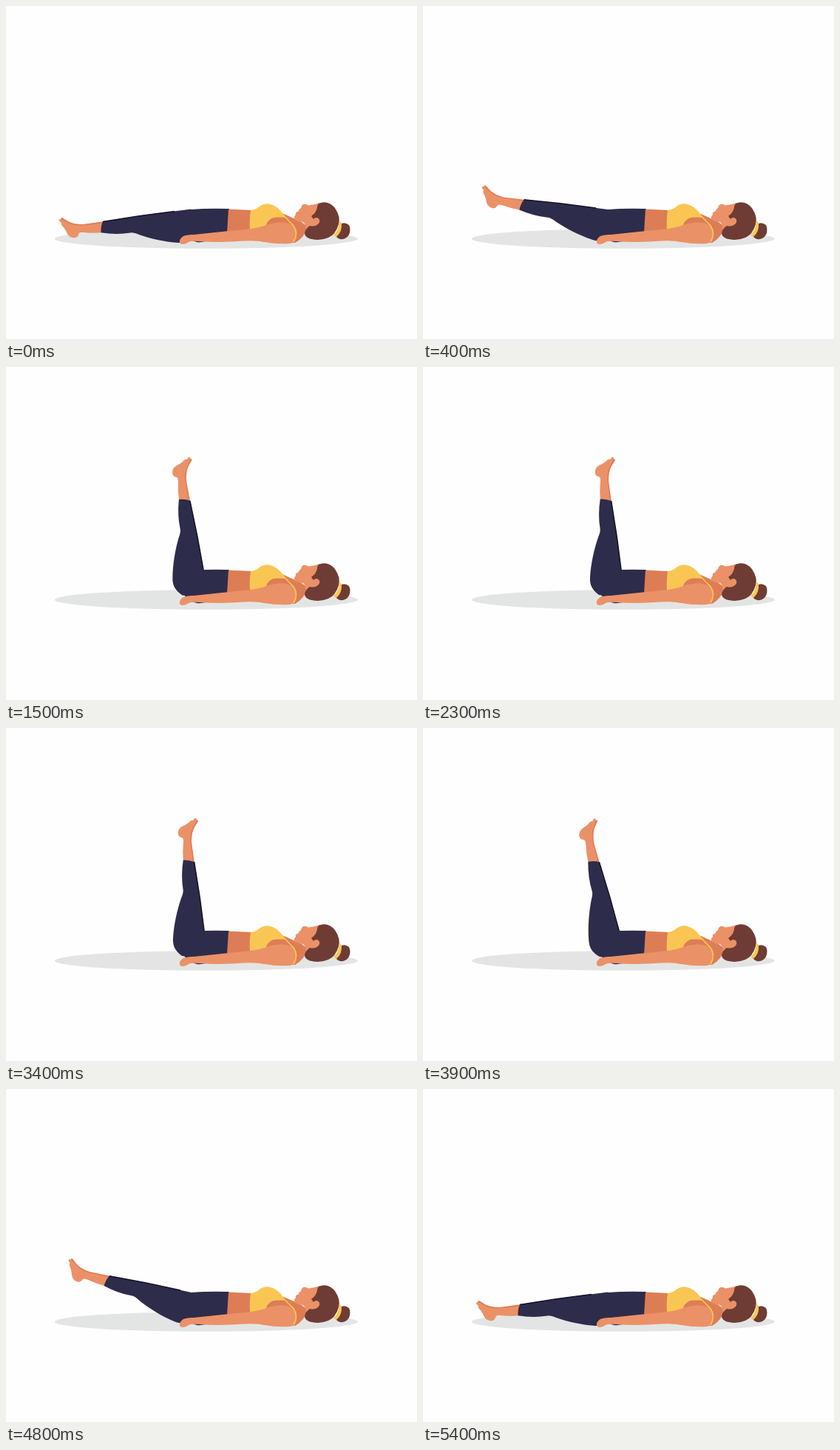
Write an HTML page with a canvas that moves like this. It is 556 px wide and 450 px high and loops after 6000 ms.

```html
<!DOCTYPE html>
<html lang="en">
<head>
<meta charset="utf-8">
<title>Leg raise</title>
<style>
html, body { margin: 0; width: 100%; height: 100%; overflow: hidden; background: #fefefe; }
canvas { display: block; }
</style>
</head>
<body>
<canvas id="stage" width="556" height="450"></canvas>
<script>
const ctx = document.getElementById('stage').getContext('2d');
const LOOP = 6000, STEP = 100, TOP = 90;
const HIP = { x: 248, y: 298 };
const C = {
  floor: '#e3e5e5', pants: '#2e2c4b', seam: '#14132a',
  skin: '#eb9167', shade: '#dd7d56', top: '#f9c653', hair: '#6e3c34'
};

const shape = (color, d) => ({ color, path: new Path2D(d) });

// The leg lies flat here and is turned about the hip.
const leg = [
  shape(C.shade, 'M133 291 L104 295 Q91 295 84 291 Q79 288 76 286 Q74 286 74 289 L84 301 L132 301Z'),
  shape(C.skin, 'M133 293 Q116 295 103 296.5 Q91 297 84 293 Q78 289 73 288 Q71 289 72.5 291 L75 293 Q74 296 78 299 Q81 303 83 308 Q86 313 92 313.3 Q97 313 98 309 Q98 306 103 306 Q118 307.5 132 306Z'),
  shape(C.pants, 'M131 291 Q190 281.5 250 274.5 L260 290 L258 308 C250 319 242 320.5 234 320 C216 319 196 314.5 180 309 Q172 305.5 168 306.5 Q150 309.5 128.5 306.3 Q128 298 131 291Z')
];
const seam = new Path2D('M131 291.4 Q180 283 228 277.4');

const body = [
  shape(C.pants, 'M250 275 Q274 273 302 274 L302 312 L277 316 Q268 320 258 319 Q245 316 240 306 Q248 290 250 275Z'),
  shape(C.shade, 'M301 274.5 L333 276 L376 281 L400 292 L408 298 Q404 313 391 320 L350 319 L299 306 Q300 290 301 274.5Z'),
  shape(C.skin, 'M424 266 Q417 269 409 269.5 Q406 267 402 268 Q399 270 399 273 L396 275.5 Q397 277 394 278 Q391 279 392 282 Q388 286 391 289 Q396 292 402 292 Q406 295 405 301 L425 299 L432 280Z'),
  shape(C.hair, 'M424 266.5 Q436 262 445 273 Q453 285 450 295 Q446 309 436 313 Q424 318 411 314.5 Q404 312 404 307 Q405 301 411 297 Q418 299 423 294 Q426 289 422 286.5 Q418 285 416 288 L413 284 Q420 279 421 272 Q421 268 424 266.5Z'),
  shape(C.hair, 'M452 295 Q458 291 464 296 Q467 302 464 309 Q460 316 452 315 Q446 313 446 309Z'),
  shape(C.top, 'M451 291 Q453 291 454 294 Q455 305 447 312 Q445 312 443.5 309 Q450 303 451 291Z'),
  shape(C.top, 'M331 276 Q339 275 344 270 Q349 266.5 356 267.5 Q366 269 375 281 L378 286 Q366 284 358 289 Q351 295 352 300 L330 302 Q329 288 331 276Z'),
  shape(C.skin, 'M235 317 Q236 313 241 310.5 Q247 308.5 254 309 Q290 305 323 302 Q344 300 357 294 Q372 289 383 294 Q393 300 393 309 Q393 319 384 321 Q365 322 350 319 Q338 316.5 322 317.5 Q290 320 262 318 Q251 317 247 319 Q243 322.5 238 322 Q234 321 235 317Z')
];
const armpit = new Path2D('M352 296 Q355 286 366 285.5 Q378 286 385 295 Q374 289 352 296Z');
const strap = new Path2D('M373 280 Q383 291 389 297 Q396 307 389 319');

function fill({ color, path }) {
  ctx.fillStyle = color;
  ctx.fill(path);
}

function line(path, color, width) {
  ctx.strokeStyle = color;
  ctx.lineWidth = width;
  ctx.stroke(path);
}

// Cosine ease from 0 to 1 between two times.
function ease(t, from, to) {
  const u = Math.min(1, Math.max(0, (t - from) / (to - from)));
  return (1 - Math.cos(Math.PI * u)) / 2;
}

function legAngle(t) {
  if (t < STEP) return 0;
  return TOP * (ease(t, -70, 1700) - ease(t, 3555, 5355));
}

function draw(t) {
  ctx.fillStyle = '#fefefe';
  ctx.fillRect(0, 0, 556, 450);
  ctx.fillStyle = C.floor;
  ctx.beginPath();
  ctx.ellipse(270.8, 314.5, 205, 13.3, 0, 0, Math.PI * 2);
  ctx.fill();

  ctx.save();
  ctx.translate(HIP.x, HIP.y);
  ctx.rotate(legAngle(t) * Math.PI / 180);
  ctx.translate(-HIP.x, -HIP.y);
  leg.forEach(fill);
  line(seam, C.seam, 1.5);
  ctx.restore();

  body.forEach(fill);
  fill({ color: C.shade, path: armpit });
  line(strap, C.top, 1.8);
}

const start = performance.now();
function tick() {
  const t = (performance.now() - start) % LOOP;
  draw(Math.floor(t / STEP) * STEP);
  requestAnimationFrame(tick);
}
tick();
</script>
</body>
</html>
```
